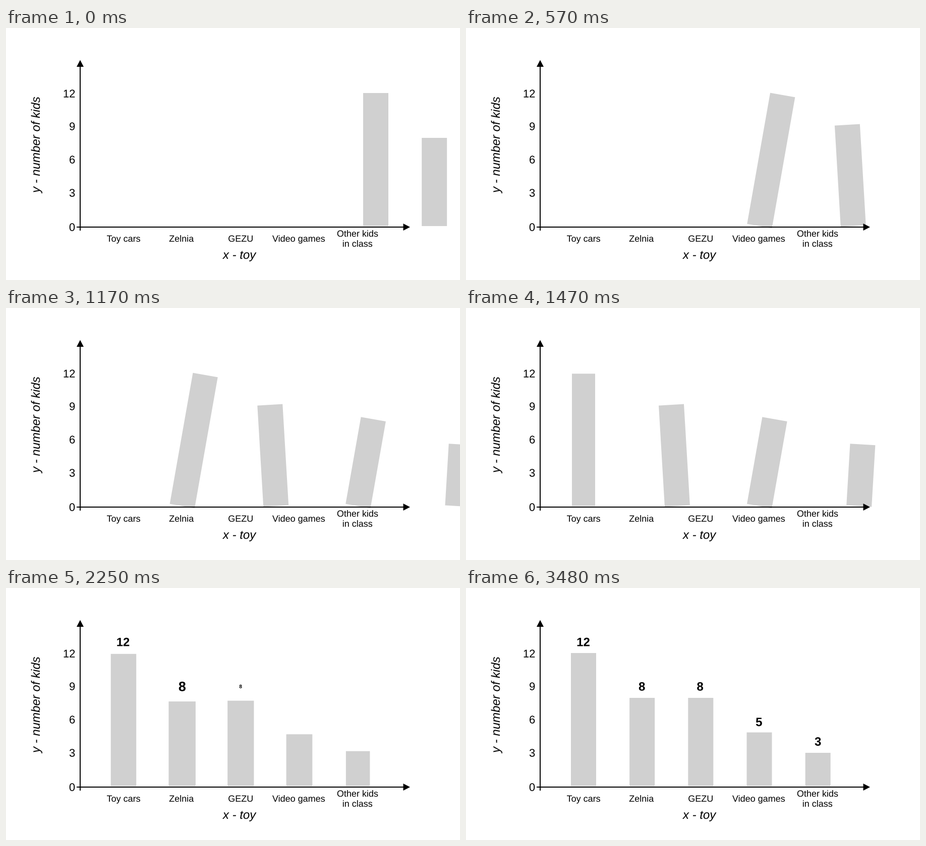
Animation, 900 px wide and 500 px high, one loop 5.52 s. Source, as a matplotlib script:

```python
import numpy as np
import matplotlib.pyplot as plt
from matplotlib.animation import FuncAnimation
from matplotlib.patches import PathPatch, Polygon
from matplotlib.textpath import TextPath
from matplotlib.transforms import Affine2D

W, H, DPI = 900, 500, 100
FRAMES, INTERVAL = 184, 30
FLOOR, BAR_W = 393, 50
GREY = "#d0d0d0"

# Walk: every bar covers the same distance in the same number of frames.
DISTANCE, WALK = 500, 43
STARTS = [6, 12, 16, 23, 30]
HEIGHTS = [264, 175, 175, 106.5, 66]
CENTRES = [233 + 116.15 * i for i in range(5)]
TILT = [-10, -3.4, 3.4, 10, 10.8, 10, 3.4, -3.4, -10, -10.8]
STRETCH = [1, 1, 1, 1, 1.05, 1.1, 1.15, 1.15, 1.1, 1.05]

# Landing: squash and stretch after the last step.
LAND = [40, 43, 45, 47, 51, 57, 61, 68, 71]
LAND_W = [1, 0.92, 0.95, 1, 1.04, 1, 1.09, 1.015, 1]
LAND_H = [1, 0.995, 1.05, 1.014, 0.96, 0.989, 0.947, 0.99, 1]

# Value labels: text, centre x, centre y.
VALUES = [("12", 232.8, 107), ("8", 348.7, 195.3), ("8", 464.1, 195.3),
          ("5", 580.8, 265.9), ("3", 697.5, 304.6)]
POP, POP_LEN = 58, 28

fig = plt.figure(figsize=(W / DPI, H / DPI), dpi=DPI, facecolor="white")
ax = fig.add_axes([0, 0, 1, 1])
ax.set_xlim(0, W)
ax.set_ylim(H, 0)
ax.axis("off")


def glyphs(text, size, weight="normal", style="normal"):
    font = dict(family="Liberation Sans", weight=weight, style=style)
    return TextPath((0, 0), text, size=size, prop=font)


def add_path(path, transform):
    patch = PathPatch(path, fc="black", lw=0, zorder=4)
    patch.set_transform(transform + ax.transData)
    return ax.add_patch(patch)


def write(text, x, baseline, size, anchor=0.5, style="normal", angle=0):
    """Place text so that the anchor share of its ink width sits at x."""
    path = glyphs(text, size, style=style)
    box = path.get_extents()
    shift = -(box.x0 + anchor * box.width)
    move = Affine2D().translate(shift, 0).scale(1, -1).rotate_deg(angle)
    return add_path(path, move.translate(x, baseline))


def block(points, colour, zorder):
    patch = Polygon(points, closed=True, fc=colour, lw=0, zorder=zorder)
    patch.set_snap(False)
    return ax.add_patch(patch)


def draw_axes():
    block([(146, 70), (148, 70), (148, 402), (146, 402)], "black", 3)
    block([(140, 394), (790, 394), (790, 396), (140, 396)], "black", 3)
    block([(147, 63.5), (154, 77), (140, 77)], "black", 3)
    block([(801, 395), (787.5, 388), (787.5, 402)], "black", 3)
    for text, y in [("12", 130), ("9", 195), ("6", 261), ("3", 327), ("0", 395)]:
        write(text, 136.3, y + 7.7, 22, anchor=1)
    for text, x, y in [("Toy cars", 233, 424), ("Zelnia", 348, 424),
                       ("GEZU", 465, 424), ("Video games", 580, 424),
                       ("Other kids", 697, 414), ("in class", 697, 434)]:
        write(text, x, y, 18)
    write("x - toy", 462.7, 458, 24, style="italic")
    write("y - number of kids", 67, 232.5, 24, style="italic", angle=-90)


def pose(n):
    """Tilt in degrees, width factor and height factor after n frames."""
    if n < 3:
        return 10 * n / 3, 1, 1
    if n < LAND[0]:
        return TILT[n % 10], 1, STRETCH[n % 10]
    tilt = -10 * max(0, WALK - n) / 3
    return tilt, np.interp(n, LAND, LAND_W), np.interp(n, LAND, LAND_H)


def bar_corners(i, n):
    tilt, sx, sy = pose(n)
    x = CENTRES[i] + DISTANCE * (1 - min(n, WALK) / WALK)
    half, top = BAR_W * sx / 2, HEIGHTS[i] * sy
    c, s = np.cos(np.radians(tilt)), np.sin(np.radians(tilt))
    corners = [(-half, 0), (half, 0), (half, top), (-half, top)]
    return [(x + u * c + v * s, FLOOR + u * s - v * c) for u, v in corners]


def place_value(i, n):
    k = n - POP
    values[i].set_visible(k > 0)
    if k <= 0:
        return
    scale, dx = 1, 0
    if k < POP_LEN:
        scale = 1 - np.exp(-0.4 * k) * np.cos(np.pi * k / 6)
        dx = 1.8 * np.exp(-0.11 * k) * np.cos(np.pi * (k - 3) / 7)
    _, x, y = VALUES[i]
    box = values[i].get_path().get_extents()
    move = Affine2D().translate(-(box.x0 + box.x1) / 2, -(box.y0 + box.y1) / 2)
    move.scale(scale, -scale).translate(x + dx, y)
    values[i].set_transform(move + ax.transData)


draw_axes()
bars = [block(bar_corners(i, 0), GREY, 2) for i in range(5)]
values = [add_path(glyphs(text, 24, weight="bold"), Affine2D())
          for text, _, _ in VALUES]


def update(frame):
    for i, start in enumerate(STARTS):
        n = max(0, frame - start)
        bars[i].set_xy(bar_corners(i, n))
        place_value(i, n)
    return bars + values


def reset():
    return update(0)


anim = FuncAnimation(fig, update, frames=FRAMES, init_func=reset,
                     interval=INTERVAL, repeat=True, repeat_delay=0, blit=False)
plt.show()
```
